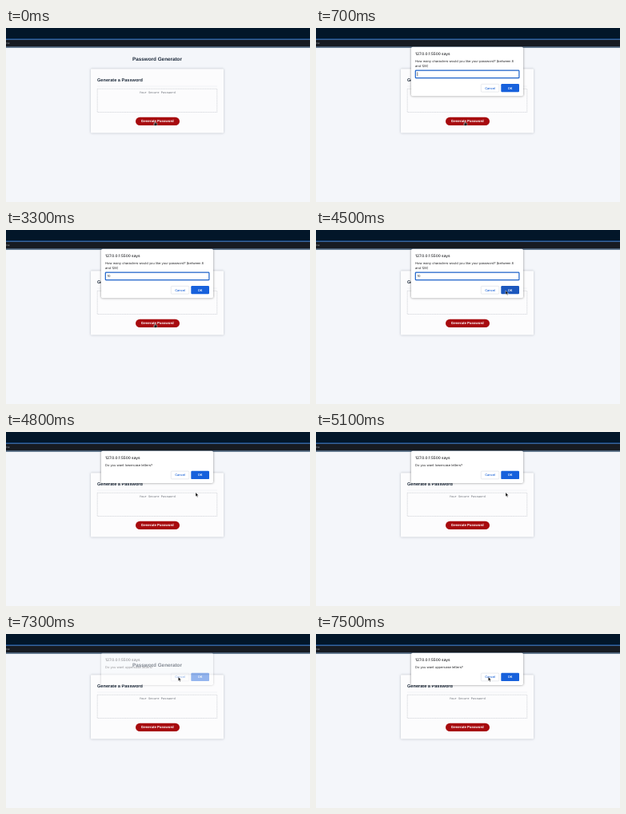
These frames come from a looping animation (380 px wide and 218 px high, 8000 ms). An HTML page:

```html
<!DOCTYPE html>
<html lang="en">
<head>
<meta charset="utf-8">
<title>Password Generator</title>
<style>
  html, body { margin: 0; width: 100%; height: 100%; overflow: hidden; background: #f4f6fa; }
  svg { display: block; width: 380px; height: 218px; }
  text { text-rendering: geometricPrecision; }
  .page { font-family: "Liberation Sans", Arial, sans-serif; font-weight: 700; fill: #1d2a3b; }
  .ui { font: 4px Inter, sans-serif; fill: #202124; }
  .mid { text-anchor: middle; }
  .card { filter: drop-shadow(0 .7px 1.4px rgba(40, 50, 70, .3)); }
  .box { filter: drop-shadow(0 .7px 1.5px rgba(0, 0, 0, .45)); }
  .label { font-weight: 500; font-size: 3.9px; }
</style>
</head>
<body>
<svg viewBox="0 0 380 218">
  <rect width="380" height="218" fill="#f4f6fa"/>
  <rect width="380" height="14" fill="#021629"/>
  <rect y="13.4" width="380" height="1.4" fill="#1c58a3"/>
  <rect y="14.8" width="380" height="8.4" fill="#171b22"/>
  <rect y="23.2" width="380" height="1.5" fill="#304a66"/>
  <text class="ui" x="0" y="20" style="font-size:3px;fill:#a9b0b8">me</text>

  <g class="page">
    <text class="mid" x="189" y="40.8" font-size="6.34">Password Generator</text>
    <rect class="card" x="106" y="51.3" width="166" height="80.2" rx=".8" fill="#fcfcfd"/>
    <text x="114" y="67" font-size="5.6">Generate a Password</text>
    <path d="M114 73H264" stroke="#e9ebee" stroke-width=".6"/>
    <rect x="114.2" y="76.2" width="149.6" height="29.3" fill="#fcfcfd"
      stroke="#c9ccd1" stroke-width=".7" stroke-dasharray="1.2 .7"/>
    <text class="mid" x="189.2" y="82.3" font-size="3.75" font-weight="400" fill="#666b73"
      font-family="Liberation Mono, monospace">Your Secure Password</text>
    <rect x="162" y="111.7" width="55" height="10.4" rx="5.2" fill="#a70a0e"/>
    <text class="mid" x="189.3" y="118.4" font-size="4.4" fill="#fff">Generate Password</text>
  </g>

  <g id="dialog" class="ui">
    <rect id="panel" class="box" x="119" y="23.7" width="140" rx="1.8" fill="#fff"/>
    <text x="124" y="33.6" style="font-size:4.75px;font-weight:500">127.0.0.1:5500 says</text>
    <text id="line1" x="124" y="42.6"></text>
    <g id="prompt">
      <text x="124" y="48.7">and 128)</text>
      <rect x="124.3" y="53.2" width="129.6" height="9.5" rx=".8" fill="#fff" stroke="#1c62c9" stroke-width="1.2"/>
      <text id="typed" x="126.4" y="59.4"></text>
      <path id="caret" stroke="#222" stroke-width=".6"/>
    </g>
    <g id="buttons">
      <rect id="cancel" x="206.3" y=".3" width="22.6" height="9.8" rx="1.2" stroke="#d8dce2" stroke-width=".6"/>
      <text class="mid label" x="217.6" y="6.6" fill="#1a62d6">Cancel</text>
      <rect id="ok" x="231.3" y="0" width="22.7" height="10.3" rx="1.2"/>
      <text class="mid label" x="242.6" y="6.6" fill="#fff" style="font-weight:600">OK</text>
    </g>
  </g>

  <path id="arrow" d="M0 0V5.1L1.2 4 2 5.9 2.9 5.5 2.1 3.7H3.7Z" fill="#000" stroke="#fff" stroke-width=".45"/>
  <path id="hand" d="M-.5 .3Q0-.3 .5 .3V2.1L2.4 2.6Q2.9 2.9 2.7 3.8L2.2 5.6H-.7L-2 3.5Q-1.8 2.8-.5 3.6Z"
    fill="#111" stroke="#fff" stroke-width=".45"/>
</svg>

<script>
const LOOP = 8000, STEP = 100;
const $ = id => document.getElementById(id);
const set = (id, attrs) => {
  for (const name in attrs) $(id).setAttribute(name, attrs[name]);
};
const show = (id, on) => set(id, { display: on ? "inline" : "none" });

// [start, text, is prompt]
const questions = [
  [0, "How many characters would you like your password? (between 8", true],
  [4800, "Do you want lowercase letters?", false],
  [7200, "Do you want uppercase letters?", false]
];
// [start, opacity]
const fades = [
  [0, 0], [500, .45], [600, .85], [700, 1],
  [7000, .55], [7100, 0], [7300, .45], [7400, .85], [7500, 1]
];
// [start, end, from, to]
const moves = [
  [3900, 4500, [186.3, 116.7], [237, 75.8]],
  [5900, 6600, [237, 75.8], [215.3, 53.8]]
];

const latest = (rows, t) => rows.filter(row => row[0] <= t).pop();

function pointer(t) {
  const [start, end, from, to] = latest(moves, t) || moves[0];
  const k = Math.min(1, Math.max(0, (t - start) / (end - start)));
  const ease = k * k * (3 - 2 * k);
  return from.map((v, i) => v + (to[i] - v) * ease);
}

function caretOn(t) {
  return t < 2700
    ? t < 1300 || (t >= 1800 && t < 2300)
    : Math.floor((t - 2800) / 500) % 2 === 0;
}

function draw(t) {
  const [, text, prompt] = latest(questions, t);
  const [x, y] = pointer(t);
  const top = prompt ? 70 : 48.8;
  const over = (left, right) => x > left && x < right && y > top && y < top + 10;
  const typed = t < 2700 ? "" : t < 2800 ? "1" : "10";
  const caretX = 126.8 + typed.length * 2.2;

  set("dialog", { opacity: latest(fades, t)[1] });
  set("panel", { height: prompt ? 61.5 : 40.3 });
  $("line1").textContent = text;
  show("prompt", prompt);
  $("typed").textContent = typed;
  set("caret", { d: `M${caretX} 55.3V60.3` });
  show("caret", caretOn(t));

  set("buttons", { transform: `translate(0 ${top})` });
  set("cancel", { fill: over(206, 229) && t < 7200 ? "#dce8f9" : "#fff" });
  set("ok", { fill: over(231, 254) ? "#1c57bd" : "#1761dc" });

  const onButton = x < 217 && y > 111.7;
  show("hand", onButton);
  show("arrow", !onButton);
  set(onButton ? "hand" : "arrow", { transform: `translate(${x} ${y})` });
}

const origin = performance.now();
function tick() {
  const t = (performance.now() - origin) % LOOP;
  draw(Math.floor(t / STEP) * STEP);
  requestAnimationFrame(tick);
}
tick();
</script>
</body>
</html>
```
